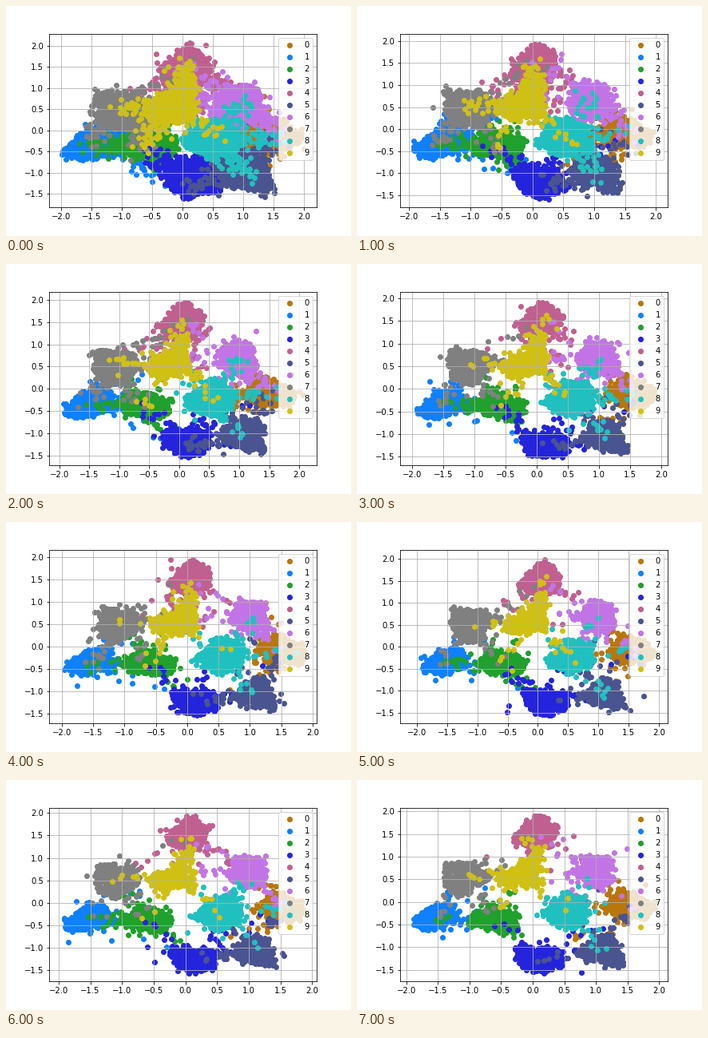
A matplotlib script for the animation above (8 s loop, 432 px wide and 288 px high).

```python
import numpy as np
import matplotlib.pyplot as plt
from matplotlib.animation import FuncAnimation
from matplotlib.ticker import MultipleLocator

COLORS = ["#b8760c", "#0f80ff", "#20a02c", "#2424dc", "#c06090",
          "#4a5490", "#c274e6", "#808080", "#20c0c0", "#d0c014"]

# x min, x max, y min, y max for each step
VIEWS = [(-2.197, 2.208, -1.814, 2.290), (-2.143, 2.188, -1.774, 2.166),
         (-2.1667, 2.2863, -1.720, 2.184), (-2.192, 2.095, -1.6924, 2.1496),
         (-2.200, 2.060, -1.720, 2.170), (-2.277, 2.143, -1.737, 2.210),
         (-2.150, 2.070, -1.740, 2.120), (-2.0985, 2.1335, -1.7498, 2.0817)]

# rough outline of each settled cluster
OUTLINES = [np.array(p) for p in (
    [(1.18, -.05), (1.42, .3), (1.95, -.1), (1.75, -.35), (1.35, -.35)],
    [(-1.93, -.46), (-1.7, -.63), (-1.15, -.42), (-1.3, -.05), (-1.6, -.1)],
    [(-1.0, -.35), (-.72, -.05), (-.2, -.3), (-.32, -.65), (-.8, -.55)],
    [(-.25, -1.0), (.4, -1.02), (.45, -1.4), (.1, -1.56), (-.15, -1.35)],
    [(.08, 1.98), (.36, 1.65), (.28, 1.3), (-.05, 1.22), (-.32, 1.42)],
    [(.75, -1.1), (1.05, -.72), (1.3, -.85), (1.42, -1.42), (.9, -1.28)],
    [(.7, .6), (.85, 1.02), (1.18, 1.0), (1.28, .5), (1.0, .32)],
    [(-1.4, .87), (-1.38, .3), (-1.1, .12), (-.72, .5), (-.88, .82)],
    [(.1, -.3), (.5, .2), (.82, .05), (.88, -.4), (.5, -.6)],
    [(.1, 1.25), (.15, .4), (-.4, .3), (-.58, .52), (-.1, .8)],
)]
MIDDLES = np.array([p.mean(axis=0) for p in OUTLINES])


def looseness(step):
    """Training tightens the clusters: 1 at first, then towards 0."""
    return np.exp(-step / 1.5)


def core(rng, k, loose):
    shape, mid = OUTLINES[k], MIDDLES[k]
    n = int(330 + 750 * loose)
    i = rng.integers(len(shape), size=n)
    s, r, pull = rng.random((3, n, 1))
    edge = shape[i] * (1 - s) + shape[(i + 1) % len(shape)] * s
    pts = mid + (edge - mid) * np.sqrt(r) * (1 + .22 * loose)
    pts += rng.normal(0, .035, pts.shape)
    halo = rng.random(n) < .06
    pts[halo] += rng.normal(0, .14, (halo.sum(), 2))
    # loose clusters smear towards the origin
    return pts * (1 - .38 * loose * pull ** 2)


def trails(rng, k, loose):
    """Points that stray towards the four nearest clusters."""
    gaps = np.hypot(*(MIDDLES - MIDDLES[k]).T)
    near = np.argsort(gaps)[1:5]
    share = gaps[near] ** -2.0
    n = int(55 + 260 * loose)
    goal = MIDDLES[rng.choice(near, n, p=share / share.sum())]
    t = rng.random((n, 1)) ** 1.5
    noise = rng.normal(0, .08 + .05 * loose, (n, 2))
    return MIDDLES[k] + (goal - MIDDLES[k]) * t + noise


def cloud(step, k):
    rng = np.random.default_rng(100 * step + k)
    loose = looseness(step)
    pts = np.vstack([core(rng, k, loose), trails(rng, k, loose)])
    # the outer 1/22 of the view stays free of points
    x0, x1, y0, y1 = VIEWS[step]
    low, high = np.array([x0, y0]), np.array([x1, y1])
    margin = (high - low) / 22
    return pts[np.all((pts > low + margin) & (pts < high - margin), axis=1)]


fig, ax = plt.subplots(figsize=(6, 4), dpi=72)
fig.subplots_adjust(left=.125, right=.9, bottom=.125, top=.88)
dots = [ax.scatter([], [], color=c, label=str(k)) for k, c in enumerate(COLORS)]
ax.grid(True)
for axis in (ax.xaxis, ax.yaxis):
    axis.set_major_locator(MultipleLocator(.5))
ax.legend(loc="upper right")


def draw(step):
    x0, x1, y0, y1 = VIEWS[step]
    ax.set(xlim=(x0, x1), ylim=(y0, y1))
    for k, d in enumerate(dots):
        d.set_offsets(cloud(step, k))
    return dots


anim = FuncAnimation(fig, draw, frames=len(VIEWS), interval=1000,
                     init_func=lambda: draw(0), repeat=True, repeat_delay=0)
plt.show()
```
